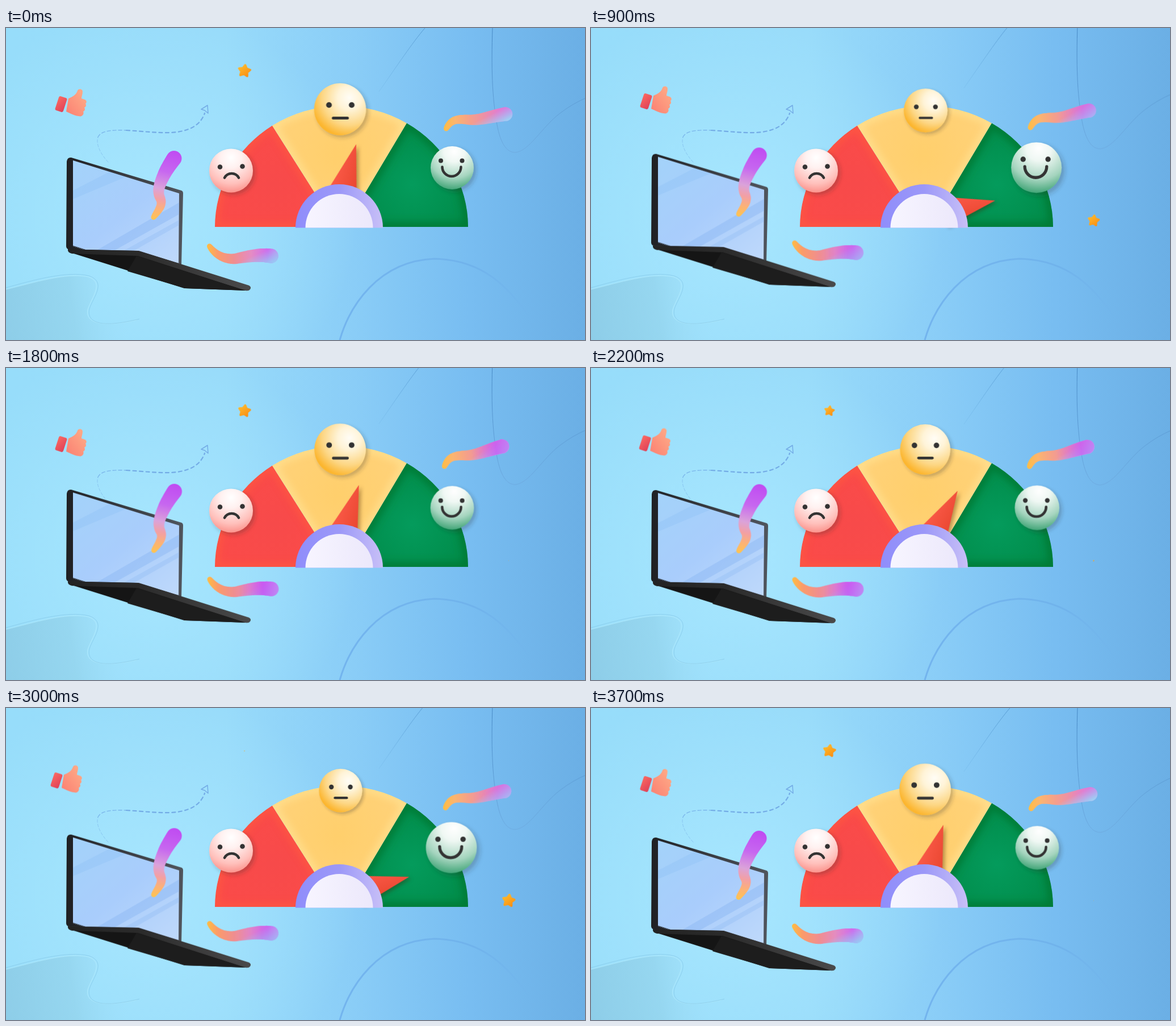
An HTML page for the animation above (3800 ms loop, 1020 px wide and 549 px high).

```html
<!DOCTYPE html>
<html lang="en">
<head>
<meta charset="utf-8">
<title>Satisfaction gauge</title>
<style>
html, body { margin: 0; width: 100%; height: 100%; overflow: hidden; background: #8fd0f7; }
svg { display: block; width: 100vw; height: 100vh; }

.move { animation: 3.8s infinite cubic-bezier(.364, 0, .636, 1); }
.half { animation-duration: 1.9s; }
.lift { animation-name: lift; }
.lift-s { animation-name: liftS; }
.swing { animation-name: swing; transform-origin: 775px 178px; }
.tint { animation-name: tint; }
.needle { animation-name: needle; }
.star-a { animation-name: starA; }
.star-b { animation-name: starB; }
.calm { animation-name: calm; }
.happy { animation-name: happy; }
.thumb { animation-name: thumb; }

@keyframes lift { 50% { transform: translate(0, -14px); } }
@keyframes liftS { 50% { transform: translate(.5px, -12.3px); } }
@keyframes swing { 50% { transform: translate(-3px, -4px) rotate(-5.3deg); } }
@keyframes tint { 0%, 100% { opacity: 0; } 50% { opacity: .85; } }
@keyframes needle {
  0%, 50.3%, 100% { transform: rotate(15.2deg); }
  25.4%, 75.1% { transform: rotate(78deg); }
}
@keyframes starA {
  0%, 50.3%, 100% { transform: scale(1); }
  25.4%, 75.1% { transform: scale(.01); }
}
@keyframes starB {
  0%, 4.2%, 100% { transform: scale(0); }
  58.4% { transform: scale(1); }
}
@keyframes calm {
  0%, 100% { transform: translate(588.5px, 143px) scale(1); }
  55.3%, 64% { transform: translate(589.5px, 145.2px) scale(.835); }
}
@keyframes happy {
  0%, 100% { transform: translate(786px, 246px) scale(1); }
  55.3%, 64% { transform: translate(784.5px, 245.6px) scale(1.18); }
}
@keyframes thumb {
  0%, 50.3%, 100% { transform: translate(0, 0); }
  25.4% { transform: translate(0, -5px); }
  75.1% { transform: translate(-8.5px, -7px); }
}
.ink { fill: none; stroke: #333; stroke-linecap: round; }
.eye { fill: #333; }
.thin { fill: none; stroke-width: 1; }
</style>
</head>
<body>
<svg viewBox="0 0 1020 549" preserveAspectRatio="none">
<defs>
  <linearGradient id="sky">
    <stop offset="0" stop-color="#97ddfa"/><stop offset=".38" stop-color="#98dbfa"/>
    <stop offset=".6" stop-color="#8aCdf7"/><stop offset=".8" stop-color="#78bdf1"/>
    <stop offset="1" stop-color="#6bafe5"/>
  </linearGradient>
  <radialGradient id="glow" gradientUnits="userSpaceOnUse" cx="250" cy="330" r="370">
    <stop offset="0" stop-color="#a9e8ff" stop-opacity=".9"/><stop offset="1" stop-color="#a9e8ff" stop-opacity="0"/>
  </radialGradient>
  <linearGradient id="pond" gradientUnits="userSpaceOnUse" x1="0" y1="520" x2="215" y2="490">
    <stop offset="0" stop-color="#8ac8e2"/><stop offset=".55" stop-color="#93d3ec"/><stop offset="1" stop-color="#a0e0fa" stop-opacity="0"/>
  </linearGradient>
  <linearGradient id="wire" gradientUnits="userSpaceOnUse" x1="0" y1="0" x2="0" y2="220">
    <stop offset="0" stop-color="#4688c4"/><stop offset="1" stop-color="#6fabe0"/>
  </linearGradient>
  <linearGradient id="wireEnd" gradientUnits="userSpaceOnUse" x1="740" y1="0" x2="657" y2="112">
    <stop offset="0" stop-color="#5598d0"/><stop offset="1" stop-color="#6aaee0" stop-opacity=".25"/>
  </linearGradient>
  <linearGradient id="arc" gradientUnits="userSpaceOnUse" x1="588" y1="0" x2="925" y2="0">
    <stop offset="0" stop-color="#73b4ee"/><stop offset=".7" stop-color="#6eb0ea" stop-opacity=".8"/><stop offset="1" stop-color="#6eb0ea" stop-opacity="0"/>
  </linearGradient>

  <radialGradient id="red" gradientUnits="userSpaceOnUse" cx="470" cy="275" r="120">
    <stop offset="0" stop-color="#f74a4a"/><stop offset="1" stop-color="#fb4b49"/>
  </radialGradient>
  <radialGradient id="yellow" gradientUnits="userSpaceOnUse" cx="585" cy="225" r="130">
    <stop offset="0" stop-color="#ffcf6c"/><stop offset="1" stop-color="#ffd27a"/>
  </radialGradient>
  <radialGradient id="green" gradientUnits="userSpaceOnUse" cx="715" cy="275" r="120">
    <stop offset="0" stop-color="#049b5c"/><stop offset="1" stop-color="#008a48"/>
  </radialGradient>
  <linearGradient id="hub">
    <stop offset="0" stop-color="#8f8dfb"/><stop offset=".5" stop-color="#9c98f8"/><stop offset="1" stop-color="#c8c0f7"/>
  </linearGradient>
  <linearGradient id="core">
    <stop offset="0" stop-color="#f7f5ff"/><stop offset="1" stop-color="#ece8fb"/>
  </linearGradient>
  <linearGradient id="hand">
    <stop offset="0" stop-color="#fc5b49"/><stop offset="1" stop-color="#e8452f"/>
  </linearGradient>

  <radialGradient id="ballRed" cx=".5" cy=".2" r=".8">
    <stop offset="0" stop-color="#fff"/><stop offset=".3" stop-color="#fff1f0"/><stop offset=".75" stop-color="#ffc0bb"/><stop offset="1" stop-color="#fb948d"/>
  </radialGradient>
  <radialGradient id="ballYellow" cx=".68" cy=".28" r=".75">
    <stop offset="0" stop-color="#fffdf6"/><stop offset=".3" stop-color="#fff4d8"/><stop offset=".7" stop-color="#fdd785"/><stop offset="1" stop-color="#fcb62f"/>
  </radialGradient>
  <radialGradient id="ballGreen" cx=".55" cy=".12" r=".88">
    <stop offset="0" stop-color="#fff"/><stop offset=".28" stop-color="#f0f8f4"/><stop offset=".7" stop-color="#a5d5bf"/><stop offset="1" stop-color="#45a77a"/>
  </radialGradient>

  <linearGradient id="glass" gradientUnits="userSpaceOnUse" x1="130" y1="240" x2="280" y2="420">
    <stop offset="0" stop-color="#a4d2fa"/><stop offset=".5" stop-color="#a9cdfc"/><stop offset="1" stop-color="#bdd8fb"/>
  </linearGradient>
  <linearGradient id="bezel"><stop offset="0" stop-color="#1f2023"/><stop offset="1" stop-color="#50555d"/></linearGradient>
  <linearGradient id="edge"><stop offset="0" stop-color="#232323"/><stop offset=".4" stop-color="#2b2b2b"/><stop offset="1" stop-color="#4a4a4b"/></linearGradient>
  <linearGradient id="cuff" x1="0" y1="0" x2="1" y2="1"><stop offset="0" stop-color="#fb6a62"/><stop offset="1" stop-color="#df4058"/></linearGradient>
  <linearGradient id="palm" x1="1" y1="0" x2="0" y2="1"><stop offset="0" stop-color="#ffb08a"/><stop offset="1" stop-color="#fb7f72"/></linearGradient>
  <linearGradient id="gold" x1="0" y1="0" x2="1" y2="1"><stop offset="0" stop-color="#ffbe2e"/><stop offset="1" stop-color="#f98d12"/></linearGradient>

  <linearGradient id="rib1" gradientUnits="userSpaceOnUse" x1="262" y1="338" x2="290" y2="216">
    <stop offset="0" stop-color="#ffc54f"/><stop offset=".16" stop-color="#fcb277"/><stop offset=".3" stop-color="#f3a0a4"/>
    <stop offset=".45" stop-color="#dba3da"/><stop offset=".7" stop-color="#c767f0"/><stop offset="1" stop-color="#c04cf2"/>
  </linearGradient>
  <linearGradient id="rib2" gradientUnits="userSpaceOnUse" x1="354" y1="0" x2="480" y2="0">
    <stop offset="0" stop-color="#ffbd42"/><stop offset=".15" stop-color="#fb9b6b"/><stop offset=".38" stop-color="#f08e90"/>
    <stop offset=".62" stop-color="#e48cc4"/><stop offset=".85" stop-color="#cf6bee"/><stop offset="1" stop-color="#c78df2"/>
  </linearGradient>
  <linearGradient id="cool2" gradientUnits="userSpaceOnUse" x1="455" y1="392" x2="466" y2="417">
    <stop offset="0" stop-color="#8fd4f4" stop-opacity="0"/><stop offset="1" stop-color="#92d2f5" stop-opacity=".95"/>
  </linearGradient>
  <linearGradient id="hot2" gradientUnits="userSpaceOnUse" x1="410" y1="0" x2="480" y2="0">
    <stop offset="0" stop-color="#d860e0" stop-opacity="0"/><stop offset=".6" stop-color="#c855f3"/><stop offset="1" stop-color="#c67df3"/>
  </linearGradient>
  <linearGradient id="rib3" gradientUnits="userSpaceOnUse" x1="771" y1="0" x2="892" y2="0">
    <stop offset="0" stop-color="#ffbd42"/><stop offset=".17" stop-color="#fcb56f"/><stop offset=".38" stop-color="#f5a089"/>
    <stop offset=".6" stop-color="#ec8fa8"/><stop offset=".8" stop-color="#e27dd0"/><stop offset="1" stop-color="#cf7cea"/>
  </linearGradient>
  <linearGradient id="cool3" gradientUnits="userSpaceOnUse" x1="866" y1="146" x2="876" y2="166">
    <stop offset="0" stop-color="#a5c8f5" stop-opacity="0"/><stop offset="1" stop-color="#9cd0f4"/>
  </linearGradient>
  <linearGradient id="hot3" gradientUnits="userSpaceOnUse" x1="825" y1="0" x2="892" y2="0">
    <stop offset="0" stop-color="#d860e0" stop-opacity="0"/><stop offset=".65" stop-color="#c95cf2"/><stop offset="1" stop-color="#c477f3"/>
  </linearGradient>

  <filter id="soft" x="-20%" y="-20%" width="140%" height="140%"><feGaussianBlur stdDeviation="7"/></filter>
  <filter id="shade" x="-30%" y="-30%" width="170%" height="170%"><feDropShadow dx="4" dy="4" stdDeviation="3.5" flood-color="#333" flood-opacity=".27"/></filter>
  <path id="wedgeR" d="M368 350A223 213 0 0 1 469 171.7L582 350Z"/>
  <path id="wedgeY" d="M469 171.7A223 213 0 0 1 706 167.5L597 350H582Z"/>
  <path id="wedgeG" d="M706 167.5A223 213 0 0 1 814 350H597Z"/>
  <clipPath id="clipR"><use href="#wedgeR"/></clipPath>
  <clipPath id="clipY"><use href="#wedgeY"/></clipPath>
  <clipPath id="clipG"><use href="#wedgeG"/></clipPath>
  <path id="glassShape" d="M118 233L305 291L304 415L232 393L140 391L118 384Z"/>
  <clipPath id="clipGlass"><use href="#glassShape"/></clipPath>
  <path id="star" stroke="url(#gold)" stroke-width="4" stroke-linejoin="round" fill="url(#gold)"/>
</defs>

<rect width="1020" height="549" fill="url(#sky)"/>
<rect width="1020" height="549" fill="url(#glow)"/>

<path d="M0 460C50 448 105 430 145 438C174 448 150 475 144 495C139 518 165 528 230 516V549H0Z" fill="url(#pond)" opacity=".75"/>
<path class="thin" d="M0 460C50 448 105 430 145 438C174 448 150 475 144 495C139 518 165 528 230 514" stroke="#b4ecfd" opacity=".7"/>
<path class="thin" d="M0 457C50 443 108 427 146 436C178 447 154 473 147 494C141 520 170 528 235 512" stroke="#7fbfe0" opacity=".55"/>
<path d="M588 549C605 490 655 410 755 406C840 408 885 455 925 512" fill="none" stroke="url(#arc)" stroke-width="3"/>

<g class="move lift">
  <path class="thin" d="M740 -3L738 0C715 27 690 65 657 112" stroke="url(#wireEnd)"/>
  <path class="thin" d="M857 0C855 70 856 120 865 170C871 203 882 219 897 219C922 217 944 174 976 150Q998 133 1024 122" stroke="url(#wire)"/>
</g>

<g fill="none" stroke="#74ace6" stroke-linecap="round">
  <path d="M180 236C166 221 158 204 162 192" stroke-width="1" stroke-dasharray="5 3" opacity=".5"/>
  <path d="M162 192C167 181 185 179 212 180" stroke-width="1.4" stroke-dasharray="6 4" opacity=".8"/>
  <path d="M212 180C245 182 268 185 291 184C322 182 342 172 350 150" stroke-width="2.2" stroke-dasharray="6 5.5"/>
  <path d="M355 136L344 143L350 145L356 150Z" stroke-width="1.5" stroke-linejoin="round"/>
</g>

<g class="move thumb">
  <rect x="-7.5" y="-13" width="15" height="26" rx="3" transform="translate(97 134) rotate(18)" fill="url(#cuff)"/>
  <path d="M110 124C118 121 124 117 126 110C128 106 135 107 135 112C135 117 133 120 133 124L139 126C143 128 142 132 140 133C142 136 141 139 138 140C140 143 139 146 136 147C138 151 135 155 131 155.500C122 155 113 150 106 147Z" fill="url(#palm)"/>
</g>

<g class="move lift">
  <path d="M107 235Q108 227 115 228L309 286Q312 287 312 291L309 417L232 397L112 390Q106 389 106 384Z" fill="url(#bezel)"/>
  <use href="#glassShape" fill="url(#glass)"/>
  <g clip-path="url(#clipGlass)">
    <path d="M118 301L211 262L182 253L118 286Z" fill="#8fc0f6" opacity=".4"/>
    <path d="M190 392L310 325V304L160 391Z" fill="#86b2f0" opacity=".4"/>
    <path d="M225 392L310 344V335L207 392Z" fill="#86b2f0" opacity=".28"/>
    <path d="M118 384L140 391L232 393L304 415" fill="none" stroke="#33383f" stroke-width="2"/>
  </g>
  <path d="M110 394L232 396L430 459L425 462L314 458Z" fill="#151515"/>
  <path d="M109 389L140 390L234 392L428 453Q433 456 430 460Q428 463 422 462L232 401L116 397Q108 395 109 389Z" fill="url(#edge)"/>
  <path d="M230 401L422 462L316 458L214 428Z" fill="#1d1d1d"/>
</g>

<g id="ribbons"></g>

<g>
  <g clip-path="url(#clipR)"><use href="#wedgeR" fill="url(#red)"/><use href="#wedgeR" fill="none" stroke="#ff5a3f" stroke-width="13" filter="url(#soft)" opacity=".75"/></g>
  <g clip-path="url(#clipY)"><use href="#wedgeY" fill="url(#yellow)"/><use href="#wedgeY" fill="none" stroke="#ffe293" stroke-width="14" filter="url(#soft)" opacity=".8"/></g>
  <g clip-path="url(#clipG)"><use href="#wedgeG" fill="url(#green)"/><use href="#wedgeG" fill="none" stroke="#007a34" stroke-width="16" filter="url(#soft)"/></g>
</g>

<g transform="translate(582 333)" style="filter:drop-shadow(4px 3px 3px rgba(60,30,0,.35))">
  <path class="move needle" d="M0 -133.3L26 -40H-28Z" fill="url(#hand)"/>
</g>
<path d="M510 351.500A77 76.500 0 0 1 664 351.500Z" fill="url(#hub)"/>
<path d="M527.500 351.500A59.500 59.500 0 0 1 646.500 351.500Z" fill="url(#core)"/>

<g transform="translate(396.500 251)">
  <circle r="38.500" fill="url(#ballRed)" filter="url(#shade)"/>
  <circle class="eye" cx="-19.500" cy="-6.500" r="4.300"/><circle class="eye" cx="20" cy="-7.500" r="4.300"/>
  <path class="ink" stroke-width="4.600" d="M-11.500 12.500C-6 2.500 8 2.500 13.500 12.500"/>
</g>
<g class="move half calm">
  <circle r="45.700" fill="url(#ballYellow)" filter="url(#shade)"/>
  <circle class="eye" cx="-19.500" cy="-7.500" r="5"/><circle class="eye" cx="20.500" cy="-7.500" r="5"/>
  <path class="ink" stroke-width="5" d="M-12 15.500H13"/>
</g>
<g class="move half happy">
  <circle r="38" fill="url(#ballGreen)" filter="url(#shade)"/>
  <circle class="eye" cx="-20" cy="-12.500" r="4"/><circle class="eye" cx="17.500" cy="-12.500" r="4"/>
  <path class="ink" stroke-width="4.500" d="M-17.500 -1.500A16.500 16.500 0 0 0 15.500 -1.500"/>
</g>

<g transform="translate(420 75.500) rotate(8)"><g class="move star-a"><use href="#star"/></g></g>
<g transform="translate(885.500 339) rotate(8)"><g class="move half star-b"><use href="#star"/></g></g>
</svg>

<script>
const NS = 'http://www.w3.org/2000/svg';
const LOOP = 3800, STEP = 100;

function add(parent, tag, attrs) {
  const el = document.createElementNS(NS, tag);
  for (const key in attrs) el.setAttribute(key, attrs[key]);
  return parent.appendChild(el);
}

// Tapered tube: circles of growing radius swept along a curve.
function tube(d, r0, r1) {
  const line = document.createElementNS(NS, 'path');
  line.setAttribute('d', d);
  const length = line.getTotalLength();
  let out = '';
  for (let i = 0; i <= 140; i++) {
    const k = i / 140, p = line.getPointAtLength(length * k);
    const r = r0 + (r1 - r0) * Math.pow(k, .7);
    out += `M${(p.x - r).toFixed(2)} ${p.y.toFixed(2)}a${r} ${r} 0 1 1 ${2 * r} 0a${r} ${r} 0 1 1 ${-2 * r} 0`;
  }
  return out;
}

function ribbon(motion, d, r0, r1, fills) {
  const g = add(document.getElementById('ribbons'), 'g', { class: 'move ' + motion });
  const shape = tube(d, r0, r1);
  fills.forEach((fill, i) => add(g, 'path', { d: shape, fill: `url(#${fill})`, class: i > 1 ? 'move tint' : '' }));
}

ribbon('lift-s', 'M260 333C268 321 277 312 272 300C265 287 271 274 279 257C285 245 291 237 296 229.500', 4.5, 13.5, ['rib1']);
ribbon('lift-s', 'M358.500 384C368 398 384 408 404 406C425 402 445 398 467 401', 4.5, 12.7, ['rib2', 'cool2', 'hot2']);
ribbon('swing', 'M775.500 177C785 159 797 161 810 161C832 164 850 156 880 151.500', 4.5, 12.3, ['rib3', 'cool3', 'hot3']);

let star = '';
for (let i = 0; i < 10; i++) {
  const r = i % 2 ? 5.5 : 10.2, a = i * Math.PI / 5 - Math.PI / 2;
  star += (i ? 'L' : 'M') + (r * Math.cos(a)).toFixed(2) + ' ' + (r * Math.sin(a)).toFixed(2);
}
document.getElementById('star').setAttribute('d', star + 'Z');

// Everything advances together at ten pictures a second.
const moves = document.getAnimations();
moves.forEach(m => m.pause());
function tick() {
  const t = Math.floor(performance.now() % LOOP / STEP) * STEP;
  moves.forEach(m => { m.currentTime = t; });
  requestAnimationFrame(tick);
}
tick();
</script>
</body>
</html>
```
